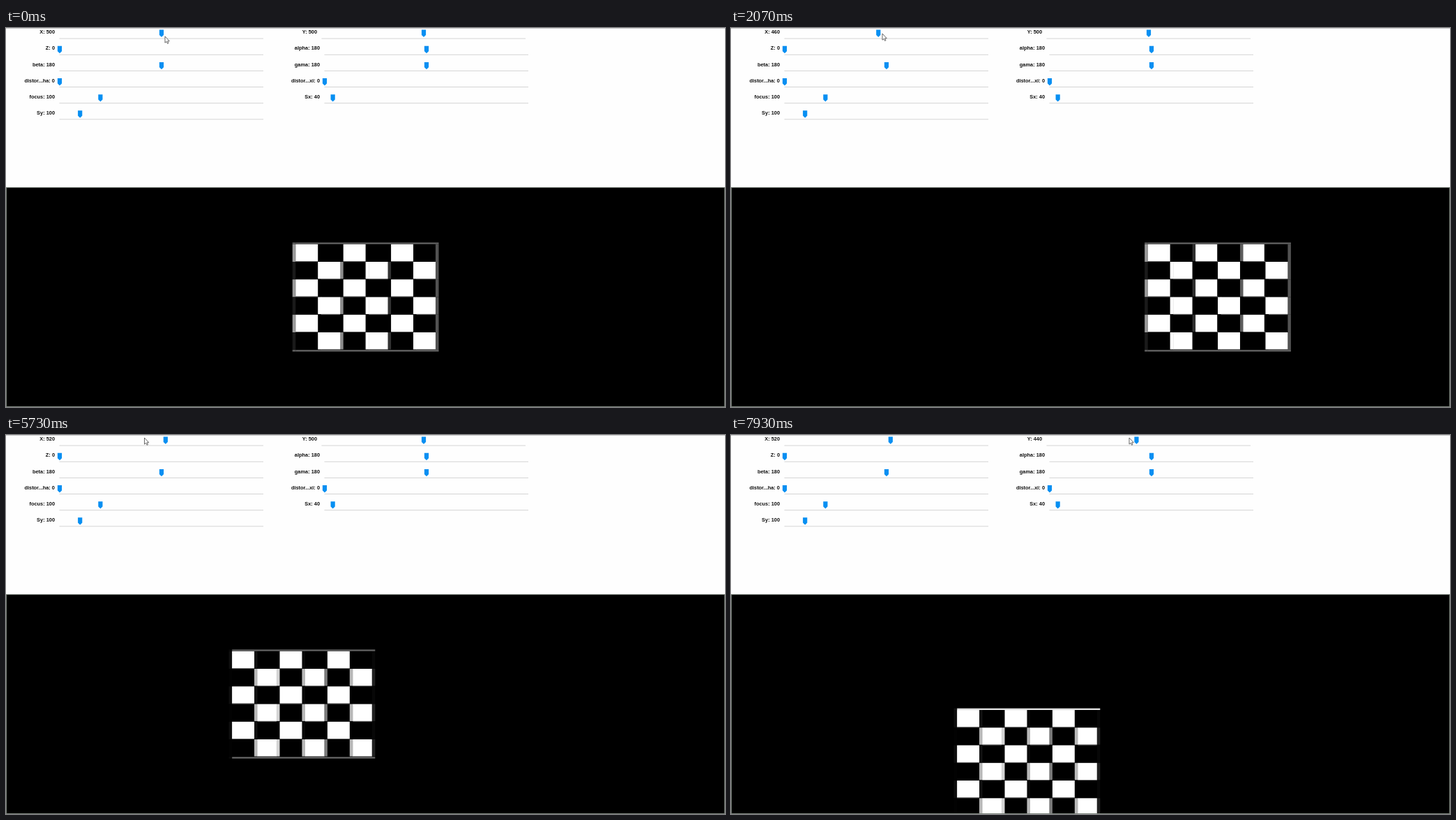
These frames come from a looping animation (1031x543 px, 8000 ms). An HTML page:

```html
<!DOCTYPE html>
<html lang="en">
<head>
<meta charset="utf-8">
<title>Camera sliders</title>
<style>
  html, body { margin: 0; width: 100%; height: 100%; overflow: hidden; background: #fff; }
  svg { display: block; width: 1031px; height: 543px; }
  text { font: bold 7.4px "Liberation Sans", Arial, sans-serif; text-anchor: end; fill: #111; }
</style>
</head>
<body>
<svg id="stage" viewBox="0 0 1031 543"></svg>
<script>
const LOOP = 8000;
const BLOCK = 4.56;      // width of one board pixel on screen
const ROW = 25.27;       // height of one board row
const stage = document.getElementById('stage');

function add(tag, attrs, parent = stage) {
  const el = document.createElementNS('http://www.w3.org/2000/svg', tag);
  set(el, attrs);
  parent.appendChild(el);
  return el;
}
function set(el, attrs) {
  for (const k in attrs) el.setAttribute(k, attrs[k]);
}
const clamp = v => Math.min(1, Math.max(0, v));
const grey = v => { const c = Math.round(255 * clamp(v)); return `rgb(${c},${c},${c})`; };

// Linear path through [[time, ...values], ...]
function follow(path, t) {
  let i = 0;
  while (i < path.length - 2 && t > path[i + 1][0]) i++;
  const [a, b] = [path[i], path[i + 1]];
  const k = clamp((t - a[0]) / (b[0] - a[0]));
  return a.slice(1).map((v, j) => v + (b[j + 1] - v) * k);
}
// The sliders move in notches of 20
const notch = (path, t) => Math.round(follow(path, t)[0] / 20) * 20;

const X_PATH = [
  [400, 500], [795, 560], [1756, 413], [2900, 580],
  [3262, 580], [3524, 540], [5250, 540], [5400, 520]
];
const Y_PATH = [[6733, 500], [7000, 540], [7325, 540], [7470, 520], [7545, 520], [7980, 440]];
const CURSOR_PATH = [
  [70, 228, 12], [200, 217, 8], [4400, 217, 8], [4900, 198, 4], [5730, 198, 4], [6470, 571, 4]
];

add('rect', { width: 1031, height: 543, fill: '#fefefe' });
add('rect', { width: 1031, height: 1, fill: '#c8c8c8' });

function slider(label, value, col, row, max) {
  const right = col ? (row ? 450 : 446) : 70;
  const left = right + 7;
  const y = row * 23.15;
  add('rect', { x: left - .5, y: 14.6 + y, width: 292.5, height: 1, fill: '#d4d4d4' });
  const text = add('text', { x: right, y: y + 8.3 });
  const thumb = add('path', { d: 'M-3.1 2.6H3.1V10L0 13L-3.1 10Z', fill: '#078ff2' });
  const update = v => {
    text.textContent = `${label}: ${v}`;
    set(thumb, { transform: `translate(${left + v / max * 292} ${y})` });
  };
  update(value);
  return update;
}
const setX = slider('X', 500, 0, 0, 1000);
const setY = slider('Y', 500, 1, 0, 1000);
slider('Z', 0, 0, 1, 1000);
slider('alpha', 180, 1, 1, 360);
slider('beta', 180, 0, 2, 360);
slider('gama', 180, 1, 2, 360);
slider('distor...ha', 0, 0, 3, 100);
slider('distor...xi', 0, 1, 3, 100);
slider('focus', 100, 0, 4, 500);
slider('Sx', 40, 1, 4, 1000);
slider('Sy', 100, 0, 5, 1000);

const clip = add('clipPath', { id: 'view' });
add('rect', { x: 1, y: 229, width: 1029, height: 313 }, clip);
add('rect', { x: .5, y: 228.5, width: 1030, height: 314, fill: '#000', stroke: '#7d857d' });
const board = add('g', {}, add('g', { 'clip-path': 'url(#view)' }));

const bar = (block, count, y, height, fill = '#000') => add('rect', {
  x: block * BLOCK, y, width: count * BLOCK, height, fill
}, board);

// Blocks where a cell begins or ends partway are shaded by how much it covers
const borders = [], cells = [];
for (let row = 0; row < 6; row++) {
  const even = row % 2;
  const y = 2.6 + row * ROW;
  borders.push({ el: bar(0, 1, y, ROW), shade: even ? .1 : .6 });
  borders.push({ el: bar(45, 1, y, ROW), shade: .32 });
  for (let k = 0; k < 3; k++) {
    const first = 15 * k + (even ? 9 : 1);
    const count = even ? 6 : 7;
    const head = bar(first - 1, 1.1, y, 24.4);
    const tail = bar(first + count - .1, 1.1, y, 24.4);
    const core = bar(first, count, y, 24.4, '#fff');
    bar(first, count, y + 24.4, .8, '#777');
    cells.push({ even, k, head, tail, core, first, count });
  }
}
const lines = [.3, 154.2].map(y => ({ main: bar(1, 45, y, 2.2), end: bar(0, 1, y, 2.2) }));

function cellCover(even, k, dx) {
  if (even) return { head: 1 - .014 * dx, tail: .55 - .35 * k + .014 * dx };
  const shift = dx < 0 ? .0045 * dx * k : .0018 * dx * (2 - k);
  return { head: -shift, tail: shift };
}

const cursor = add('path', {
  d: 'M0 0V9.2L2.1 7.4L3.6 10.4L5 9.7L3.6 6.8H6.3Z',
  fill: '#fff', stroke: '#444', 'stroke-width': .8
});

function draw(t) {
  const x = notch(X_PATH, t), y = notch(Y_PATH, t);
  const dx = x - 500, dy = y - 500;
  setX(x);
  setY(y);
  set(board, { transform: `translate(${410.75 - dx * BLOCK} ${307.1 - dy * 1.405})` });

  const rim = clamp(1 - dx / 22);
  for (const { el, shade } of borders) set(el, { fill: grey(shade * rim) });
  for (const { even, k, head, tail, core, first, count } of cells) {
    const cover = cellCover(even, k, dx);
    set(head, { fill: grey(cover.head), opacity: cover.head > 0 ? 1 : 0 });
    set(tail, { fill: grey(cover.tail), opacity: cover.tail > 0 ? 1 : 0 });
    // a cell receding on its right loses part of its last block
    const lost = !even && cover.tail < 0 ? -cover.tail * BLOCK : 0;
    set(core, { width: count * BLOCK - lost });
  }
  [.4 - .009 * dy, .41 + .0055 * dy].forEach((shade, i) => {
    set(lines[i].main, { fill: grey(shade) });
    set(lines[i].end, { fill: grey(shade * rim) });
  });

  const [cx, cy] = follow(CURSOR_PATH, t);
  set(cursor, { transform: `translate(${cx} ${cy})` });
}

const origin = performance.now();
function tick() {
  draw((performance.now() - origin) % LOOP);
  requestAnimationFrame(tick);
}
tick();
</script>
</body>
</html>
```
